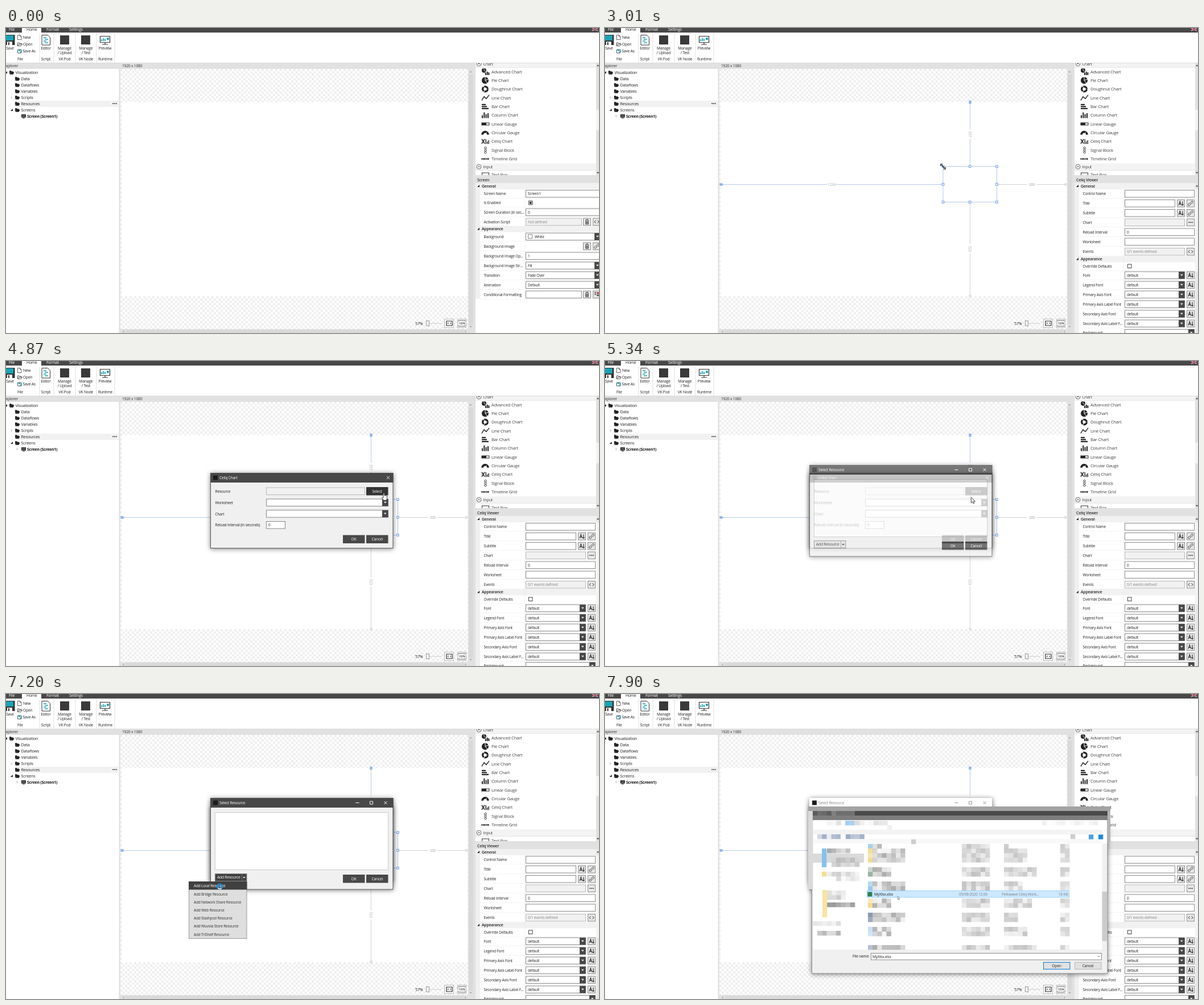
Animation of 1042 by 537 pixels, one loop 8 s. Source, as an HTML page:

```html
<!DOCTYPE html>
<html lang="en">
<head>
<meta charset="utf-8">
<title>Chart control walkthrough</title>
<style>
html, body { margin: 0; width: 100%; height: 100%; overflow: hidden; background: #fff; }
svg { display: block; width: 100%; height: 100%; }
text { font-family: "Open Sans", "Noto Sans", sans-serif; letter-spacing: -.03em; white-space: pre; }
.window { filter: drop-shadow(0 1px 4px rgba(0,0,0,.5)); }
</style>
</head>
<body>
<svg id="stage" viewBox="0 0 1042 537"></svg>
<script>
const DARK = '#484848', BAND = '#e1e1e1', BLUE = '#6d9be6', TEAL = '#1aa3b5';

// Drawing helpers; text is placed by its vertical centre.
const rect = (x, y, w, h, fill, stroke) =>
  `<rect x="${x}" y="${y}" width="${w}" height="${h}" fill="${fill}"${stroke ? ` stroke="${stroke}"` : ''}/>`;
const text = (x, y, s, size = 6.7, fill = '#222', attrs = '') =>
  `<text x="${x}" y="${y + size * .36}" font-size="${size}" fill="${fill}" ${attrs}>${s}</text>`;
const mid = (x, y, s, size, fill) => text(x, y, s, size, fill, 'text-anchor="middle"');
const line = (d, stroke = '#222', w = 1) => `<path d="${d}" fill="none" stroke="${stroke}" stroke-width="${w}"/>`;
const shape = (d, fill = '#222') => `<path d="${d}" fill="${fill}"/>`;
const circle = (x, y, r, fill, stroke = 'none', w = 1) =>
  `<circle cx="${x}" cy="${y}" r="${r}" fill="${fill}" stroke="${stroke}" stroke-width="${w}"/>`;
const at = (x, y, body) => `<g transform="translate(${x} ${y})">${body}</g>`;
const layer = (id, body, attrs = '') => `<g id="${id}" ${attrs}>${body}</g>`;
const down = (x, y, fill) => shape(`M${x - 2.3} ${y - 1.2}h4.6l-2.3 2.6z`, fill);
const up = (x, y, fill) => shape(`M${x - 2.3} ${y + 1.2}h4.6l-2.3-2.6z`, fill);
const opened = (x, y) => shape(`M${x - 2} ${y + 2}h4v-4z`);
const closed = (x, y) => line(`M${x - 1} ${y - 2}l2 2l-2 2z`, '#aaa', .6);

function ribbon() {
  let s = rect(0, 0, 1042, 8, DARK) + rect(28, 0, 34, 8, '#fff');
  [[5, 'File'], [36, 'Home'], [71, 'Format'], [111, 'Settings']].forEach(([x, t], i) =>
    s += text(x, 2.8, t, 6.9, i === 1 ? '#222' : '#fff'));
  s += rect(1030, 0, 10, 5, '#5d526f') + line('M1030 0l10 5M1040 0l-10 5', '#e8d5d5', 1)
    + line('M1035 0v5M1030 2.5h10', '#c33b45', 1.2);
  for (const x of [58.5, 83.5, 121.5, 158.5, 190.5]) s += rect(x, 10, 1, 51, '#e2e2e2');
  s += rect(0, 12, 15.5, 18, '#333') + rect(0, 13, 13, 9, TEAL) + rect(2, 24, 9, 6, '#fff') + rect(4, 25, 2, 5, '#333');
  s += mid(7, 36, 'Save');
  s += line('M20.5 12.5h4l2.5 2.5v5.5h-6.5zM24.5 12.5v2.5h2.5', '#555', .9)
    + line('M20.5 31.5v-5.5h2.5l1 1h3v1.5M20.5 31.5l2-3h6l-2 3z', '#444', .9)
    + line('M20.5 38h6.5v6h-6.5z', '#444', .9) + rect(22, 38, 3.5, 2.5, TEAL) + line('M24 44l4-4', TEAL, 1.3);
  s += text(30, 16.3, 'New') + text(30, 28.5, 'Open') + text(29.5, 40.8, 'Save As');
  s += line('M63 12.5h10.5l4 4v13.5h-14.5z', '#333', 1) + line('M66 17h5M68 20h6M66 23h5M68 26h6', TEAL, 1.3);
  s += rect(95, 13, 16, 16, '#3a3a3a') + rect(132, 13, 16, 16, '#3a3a3a');
  s += line('M165.5 14.5h17v11h-17zM174 25.5v3M169 29h10', '#333', 1.2)
    + line('M168 23v-3M171 23v-5M174 23v-4', TEAL, 1.8) + circle(179, 19, 2.2, TEAL);
  [[70, 36, 'Editor'], [103, 36, 'Manage'], [103, 43.3, '/ Upload'], [140.5, 36, 'Manage'], [140.5, 43.3, '/ Test'],
   [174, 36, 'Preview'], [25, 55, 'File'], [70, 55, 'Script'], [103, 55, 'VK Pod'], [140.5, 55, 'VK Node'], [174.5, 55, 'Runtime']]
    .forEach(a => s += mid(...a));
  return s + rect(0, 61, 1042, 1, '#dcdcdc');
}

function explorer() {
  let s = rect(0, 62, 199, 10, BAND) + text(-4, 67, 'Explorer', 6.9, '#333') + rect(16, 128, 182, 11, '#f1f1f1');
  ['Visualization', 'Data', 'Dataflows', 'Variables', 'Scripts', 'Resources', 'Screens'].forEach((t, i) => {
    const x = i ? 16 : 6, y = 78.5 + 11 * i;
    s += shape(`M${x} ${y + 3}v-6.3h3l1 1.2h3v1.6h-4.6zM${x + .6} ${y + 3.2}l1.9-4h6l-1.9 4z`) + text(x + 10.5, y, t, 7.3);
  });
  s += opened(0, 78) + closed(10, 122.5) + opened(10, 144);
  s += rect(27.5, 152.5, 7, 4.5, '#555', '#222') + rect(29, 158, 4, 1, '#222');
  s += text(37, 155.5, 'Screen (Screen1)', 6.9, '#111', 'font-weight="700"');
  for (const x of [188.2, 191, 193.8]) s += circle(x, 133, 1, '#333');
  return s + rect(198.5, 62, 2.5, 475, BAND);
}

function canvasArea() {
  let s = rect(201, 62, 621, 10, BAND) + text(204, 67, '1920 x 1080', 6.7, '#333');
  s += rect(201, 72, 611, 458, 'url(#checker)') + rect(203.5, 130.3, 607.5, 341.7, '#fff');
  s += rect(812, 72, 10, 465, BAND) + rect(813, 82, 7.5, 440, '#d9d9d9') + up(816.5, 77, '#aaa') + down(816.5, 526, '#aaa');
  s += rect(201, 530, 611, 7, BAND) + rect(211, 531.5, 593, 5, '#d9d9d9');
  s += shape('M207.5 532.3v4.4l-2.4-2.2z', '#aaa') + shape('M806.5 532.3v4.4l2.4-2.2z', '#aaa');
  s += text(719, 520.5, '57%', 7.2) + rect(744, 519.5, 21, 1, '#ccc') + rect(738.5, 515.5, 5, 9, '#f4f4f4', '#999');
  s += rect(770.5, 512.5, 16, 15, '#fff', '#b5b5b5') + rect(793.5, 512.5, 15, 15, '#fff', '#b5b5b5');
  s += line('M774 516h10v8h-10z', '#222', 1.2) + line('M778 518.5l-2 1.5l2 1.5M780 518.5l2 1.5l-2 1.5', '#222', .8);
  s += line('M795 516.5v-1.5h12v1.5M795 523.5v1.5h12v-1.5', '#333', .8) + mid(801, 520, '100%', 5, '#111');
  return s + rect(822, 62, 3, 475, BAND);
}

function toolbox() {
  const bars = list => list.map(b => rect(...b, '#222')).join('');
  const tools = [
    ['Advanced Chart', circle(-2, -2, 4, '#222') + line('M-2 -2v-5M-2 -2l4 2', '#fff', .8) + bars([[0, 2, 2, 4], [2.8, 0, 2, 6], [5.4, 1.5, 2, 4.5]])],
    ['Pie Chart', circle(0, 0, 6, '#222') + line('M0 -6v6l6 -2M0 0l4 5', '#fff', 1)],
    ['Doughnut Chart', `<circle r="4.4" fill="none" stroke="#222" stroke-width="3.2" stroke-dasharray="8.2 1"/>`],
    ['Line Chart', line('M-6 4.5l4-6.5l4 3.5l5-6.5', '#222', 1.4)],
    ['Bar Chart', bars([[-6, -4.5, 7, 2.2], [-6, -1, 9, 2.2], [-6, 2.5, 12, 2.2]])],
    ['Column Chart', bars([[-6, 0, 2, 5], [-2.7, -5, 2, 10], [.6, -2, 2, 7], [4, -3.5, 2, 8.5]])],
    ['Linear Gauge', rect(-6, -2, 13, 4, '#fff', '#222') + rect(-6, -2, 8, 4, '#222')],
    ['Circular Gauge', line('M-5 3.5a5 5 0 0 1 10 0', '#222', 3.8) + line('M0 3l3-4', '#fff', .8)],
    ['Celiq Chart', line('M-6 -4l5 8M-1 -4l-5 8', '#222', 1.6) + bars([[.5, -4, 1.4, 8.5], [3, 0, 1.4, 4.5], [5.5, -2, 1.4, 6.5]])],
    ['Signal Block', [-4, 0, 4].map(y => circle(.5, y, 1.8, '#fff', '#444')).join('')],
    ['Timeline Grid', bars([[-6.5, -1.2, 2, 2.6], [-3.5, -1.2, 3, 2.6], [.5, -1.2, 2, 2.6], [3.5, -1.2, 3, 2.6]])],
  ];
  const header = (y, t) => rect(825, y - 6, 212, 12, '#f3f3f3') + rect(825, y + 6, 212, .7, '#ddd')
    + circle(831, y, 4, '#fff', '#444', .8) + line(`M829 ${y + 1}l2-2l2 2`) + text(838.5, y, t, 7.2, '#444');
  let s = header(63, 'Chart') + layer('hover', rect(825, 192, 212, 15.3, '#f4f4f4'));
  tools.forEach(([t, icon], i) => {
    const y = 76.8 + 15.36 * i;
    s += at(842, y, icon) + text(853, y, t, 7.7, '#444');
  });
  s += header(244.3, 'Input') + rect(836.5, 255, 12, 7, '#fff', '#333') + text(853, 257.8, 'Text Box', 7.7, '#444');
  s += rect(1037, 62, 5, 197, '#e0e0e0') + rect(1037, 144, 5, 36, '#f3f3f3') + up(1040, 66, '#555') + down(1040, 255, '#555');
  return `<g clip-path="url(#toolClip)">${s}</g>`;
}

// Property panel pieces
const field = (x, right, y, t = '', off) =>
  rect(x + .5, y - 6, right - x, 12.5, off ? '#f1f1f1' : '#fff', off ? '#b8b8b8' : '#888') + text(x + 4, y + .4, t, 6.5, off ? '#888' : '#222');
const combo = (x, right, y, t = '') => field(x, right, y, t) + rect(right - 10, y - 6, 10.5, 12.5, DARK) + down(right - 4.7, y, '#fff');
const glyphs = {
  trash: line('M-3 -3h6M-1 -4.2h2M-2.3 -2v6h4.6v-6M-.8 -1v4M.8 -1v4', '#222', .9),
  code: line('M-1.5 -2.5l-2.5 2.5l2.5 2.5M1.5 -2.5l2.5 2.5l-2.5 2.5', '#222', 1),
  link: line('M-.5 -1.5l2-2a1.6 1.6 0 0 1 2.3 2.3l-2 2M.5 1.5l-2 2a1.6 1.6 0 0 1-2.3-2.3l2-2M-1.3 1.3l2.6-2.6', '#333', 1),
  font: line('M-4 3.5l2.3-7l2.3 7M-3.2 1.2h3M3 -3.5v7l-1.5-1.5M3 3.5l1.5-1.5', '#222', 1.1),
  dots: [-2.8, 0, 2.8].map(x => circle(x, 0, .9, '#222')).join(''),
  rules: line('M-4 -3h3M-4 0h3', '#222', 1.2) + rect(0, -4, 4, 3, '#c23b3b') + rect(0, 0, 4, 3, '#666'),
};
const button = (x, y, g) => rect(x + .5, y - 6, 13, 12.5, '#e8e8e8', '#888') + at(x + 7, y + .2, glyphs[g]);
const check = (y, on) => rect(918.5, y - 3, 6.5, 6.5, '#fff', '#444') + (on ? rect(920, y - 1.4, 3.5, 3.5, '#222') : '');

function panel(title, end, sections, rows) {
  let s = rect(825, 259, 217, 278, '#fff') + rect(825, 259, 217, 14, BAND) + text(828, 267.5, title, 6.9, '#333', 'font-weight="600"')
    + rect(825, 273, 8, end - 273, '#f0f0f0');
  for (const [y, t] of sections)
    s += rect(825, y - 5.5, 217, 11, '#f1f1f1') + opened(830, y - .5) + text(836, y, t, 6.9, '#222', 'font-weight="600"');
  for (const [y, label, body] of rows)
    s += rect(833, y + 8, 209, .6, '#ededed') + text(839.5, y + .4, label, 6.6) + body(y);
  return s + rect(911, 284, .6, end - 284, '#e9e9e9');
}

const screenPanel = () => panel('Screen', 477, [[278.5, 'General'], [354, 'Appearance']], [
  [291.5, 'Screen Name', y => field(913, 1044, y, 'Screen1')],
  [307.5, 'Is Enabled', y => check(y, true)],
  [324, 'Screen Duration (in sec...', y => field(913, 1044, y, '0')],
  [341, 'Activation Script', y => field(913, 1011, y, 'Not defined', true) + button(1014, y, 'trash') + button(1031, y, 'code')],
  [367, 'Background', y => combo(913, 1044, y) + rect(917.5, y - 3.5, 7, 7, '#fff', '#888') + text(929, y + .4, 'White', 6.5)],
  [384, 'Background Image', y => button(1014, y, 'trash') + button(1031, y, 'link')],
  [401, 'Background Image Op...', y => field(913, 1044, y, '1')],
  [418, 'Background Image Str...', y => combo(913, 1044, y, 'Fill')],
  [435, 'Transition', y => combo(913, 1044, y, 'Fade Over')],
  [452, 'Animation', y => combo(913, 1044, y, 'Default')],
  [469, 'Conditional Formatting', y => field(913, 1011, y) + button(1014, y, 'trash') + button(1031, y, 'rules')],
]);

function viewerPanel() {
  const titled = y => field(913, 1001, y) + button(1005, y, 'font') + button(1022, y, 'link');
  const plain = t => y => field(913, 1035, y, t);
  const extra = (t, g) => y => field(913, 1018, y, t, true) + button(1022, y, g);
  const fonts = ['Font', 'Legend Font', 'Primary Axis Font', 'Primary Axis Label Font', 'Secondary Axis Font', 'Secondary Axis Label F...']
    .map((t, i) => [435 + 17 * i, t, y => combo(913, 1018, y, 'default') + button(1022, y, 'font')]);
  return panel('Celiq Viewer', 537, [[278.5, 'General'], [407, 'Appearance']], [
    [291.5, 'Control Name', plain('')], [308.5, 'Title', titled], [325.5, 'Subtitle', titled],
    [342, 'Chart', extra('', 'dots')], [359, 'Reload Interval', plain('0')], [376, 'Worksheet', plain('')],
    [393.5, 'Events', extra('0/1 events defined', 'code')], [419, 'Override Defaults', y => check(y)],
    ...fonts, [536.5, 'Background', y => combo(913, 1035, y)],
  ]) + rect(1037, 273, 5, 264, '#e6e6e6') + rect(1037, 284, 5, 145, '#f3f3f3') + up(1040, 278, '#555');
}

function selection() {
  const label = (x, y, s, turn) => at(x, y, `<g transform="rotate(${turn})">${rect(-8, -4, 16, 8, '#fff')}${mid(0, 0, s, 6.6, '#b0b0b0')}</g>`);
  let s = line('M204 275.5H594M641.5 131V243', '#b7caee') + line('M689 275.5H809M641.5 307V471', '#d2d2d2');
  s += label(398, 275.5, '1234', 0) + label(750, 275.5, '386', 0) + label(641.5, 187, '357', 90) + label(641.5, 389, '523', 90);
  s += rect(202, 274, 4, 3, '#a9c6f5', BLUE) + rect(640, 128.5, 3, 4, '#a9c6f5', BLUE);
  s += rect(808, 274, 2.5, 3, '#fff', '#ccc') + rect(640, 470.5, 3, 3, '#fff', '#ccc');
  s += rect(594, 243.5, 94.5, 63, '#fff', '#b3c8f0');
  for (const x of [594, 641.2, 688.5]) for (const y of [243.8, 275.2, 306.5])
    if (x !== 641.2 || y !== 275.2) s += rect(x - 1.8, y - 1.8, 3.6, 3.6, '#fff', BLUE);
  return s + closed(20, 155);
}

const push = (x, y, t, id = '') => `<rect ${id} x="${x}" y="${y}" width="38.5" height="14.5" fill="${DARK}"/>` + mid(x + 19.2, y + 7.4, t, 6.7, '#fff');
const frame = (y, h, title, id) => rect(359.5, y + .5, 320.5, h, '#f0f0f0', '#555')
  + `<rect id="${id}Bar" x="359" y="${y}" width="321.5" height="17" fill="${DARK}"/>` + rect(364, y + 4.5, 8, 8, '#1c1c1c')
  + text(375, y + 8.8, title, 6.6, '#fff', `id="${id}Title"`);

function chartDialog() {
  let s = frame(197, 132, 'Celiq Chart', 'chart') + line('M669 203l5 5M674 203l-5 5', '#fff', .9);
  ['Resource', 'Worksheet', 'Chart', 'Reload Interval (in seconds)'].forEach((t, i) => s += text(367.5, 230 + 19.7 * i, t, 6.6));
  s += field(457, 630, 229, '', true) + push(633, 222, 'Select', 'id="select"') + combo(457, 671, 249) + combo(457, 671, 268.7) + field(457, 490, 288.5, '0');
  return s + push(592, 306.5, 'OK') + push(633, 306.5, 'Cancel');
}

function resourceDialog() {
  let s = frame(183, 160.5, 'Select Resource', 'resource');
  s += `<g id="resourceKeys" fill="none" stroke="#fff"><path d="M614.5 191.5h6M639.5 189h5v5h-5zM664.5 189l5 5M669.5 189l-5 5"/></g>`;
  s += rect(367.5, 208.5, 304, 101, '#fff', '#ccc');
  s += `<rect id="addBack" x="367.5" y="316.5" width="55.5" height="13" stroke="#888"/><g id="addText">`
    + text(371, 323, 'Add Resource', 6.7, 'inherit') + `<path d="M416.2 322h4.6l-2.3 2.6z"/></g>` + rect(414, 317, .7, 12, '#888');
  return s + push(592, 318, 'OK') + push(633, 318, 'Cancel');
}

function menu() {
  let s = rect(321.5, 330.5, 101.5, 100, '#dedede', '#999') + layer('menuHover', rect(321, 330, 102.5, 14.5, '#404040'));
  ['Local', 'Bridge', 'Network Share', 'Web', 'Stashpod', 'Wuvola Store', 'TriShelf'].forEach((t, i) =>
    s += text(330, 338 + 14.2 * i, `Add ${t} Resource`, 6.5, '#333', i ? '' : 'id="firstItem"'));
  return s;
}

function fileDialog() {
  let seed = 11;
  const random = () => (seed = seed * 16807 % 2147483647) / 2147483647;
  const blocks = (x, y, cols, rows, color, low = .2, high = 1) => {
    let s = '';
    for (let i = 0; i < cols * rows; i++)
      s += `<rect x="${x + i % cols * 8.2}" y="${y + (i / cols | 0) * 8.2}" width="8.3" height="8.3" fill="${color}" opacity="${(low + random() * (high - low)).toFixed(2)}"/>`;
    return s;
  };
  let s = `<g class="window">${rect(363.5, 222, 519.5, 270, '#f0f0f0', '#888')}</g>`;
  s += rect(357, 198, 531, 8.2, '#a3a3a3') + rect(357, 206, 8.2, 138, '#dadada') + rect(882, 206, 6, 55, '#b5b5b5');
  s += rect(365, 206, 518, 8.3, '#4a4a4a') + blocks(365, 206, 9, 1, '#a0a0a0', .2, .7) + rect(365, 214, 518, 8.3, '#7d7d7d');
  s += rect(366, 222, 516, 228, '#fff') + rect(366, 239, 508, 8.2, '#f3f3f3') + rect(366, 255, 508, 8.2, '#f8f8f8');
  s += blocks(390, 223, 13, 1, '#ccc', 0, .8) + blocks(422, 223, 2, 1, '#9fcdf2', .8) + blocks(496, 231, 1, 1, '#ddd') + blocks(768, 223, 12, 1, '#ddd', 0, .5);
  s += blocks(373, 247, 5, 1, '#9cacc4') + blocks(423, 247, 4, 1, '#9cacc4', .6) + blocks(538, 256, 1, 1, '#ccc', .9)
    + blocks(818, 247, 1, 1, '#ccc', .9) + rect(850, 247.5, 8.3, 8.3, '#4aa2e2') + rect(867, 247.5, 8.3, 8.3, '#2389da');
  s += rect(365, 281, 90, 16, '#dadada') + blocks(390, 272, 5, 1, '#aaa') + blocks(398, 288, 6, 2, '#b5b5b5', .1, .8)
    + blocks(390, 313, 7, 2, '#c5c5c5', 0, .8) + blocks(390, 346, 4, 2, '#c9c9c9') + blocks(390, 367, 6, 1, '#9a9a9a', .4)
    + blocks(365, 400, 6, 1, '#ddd') + blocks(373, 417, 5, 1, '#b5b5b5', .4);
  s += rect(381, 272, 8.3, 33, '#86c1ec') + rect(381, 313, 8.3, 8.3, '#f4dd94') + rect(382, 345, 8.3, 48, '#f8e3a2');
  [[264, 1, '#9cc9ec'], [272, 3, '#f4d98a'], [305, 2, '#8fae9a'], [330, 2, '#8ec3ee'], [360, 2, '#f4d98a'], [385, 2, '#8b98b3'], [410, 2, '#a8cff0'], [442, 1, '#7388b0']]
    .forEach(([y, n, icon], i) => {
      s += blocks(462, y, 1, n, icon, .5) + blocks(470, y, i ? 4 + i * 3 % 6 : 2, n, '#a5a5a5', .1, .9)
        + blocks(627, y, 6, n, '#b0b0b0', .2, .8) + blocks(701, y, i ? 3 + i * 2 % 5 : 1, n, '#bdbdbd', .2, .9) + blocks(800, y, 2, n, '#c4c4c4', .2, .9);
    });
  s += rect(873.5, 263, 8.5, 187, '#f0f0f0') + rect(873.5, 348, 8.5, 87, '#cbcbcb');
  s += rect(460, 346, 356, 13, '#fff') + layer('picked', rect(460.5, 346.5, 355, 11.5, '#cce8ff', '#99d1ff'));
  s += rect(461.5, 348.5, 8, 8, '#2f7d55') + text(473, 352.3, 'MyXlsx.xlsx', 6.7);
  s += text(622, 352.3, '05/08/2020 12:06', 6.5, '#7d7d7d') + text(697, 352.3, 'Pellowave Celiq Work...', 6.5, '#7d7d7d') + text(797, 352.3, '16 KB', 6.5, '#7d7d7d');
  s += text(464.5, 462, 'File name:', 6.6, '#222', 'text-anchor="end"') + rect(467.5, 456.5, 405, 11.5, '#fff', '#8a8a8a')
    + line('M865.5 461l2 2l2-2', '#555', .9) + layer('fileName', text(470, 462.3, 'MyXlsx.xlsx', 6.6));
  s += rect(770.5, 472.5, 46.5, 12, '#e1e1e1', '#0078d7') + rect(825.5, 472.5, 46.5, 12, '#e1e1e1', '#b5b5b5');
  return s + mid(793.5, 478.5, 'Open', 6.7) + mid(848.5, 478.5, 'Cancel', 6.7);
}

const arrow = `<path d="M0 0v10.2l2.4-2.2l1.6 3.5l1.6-.8l-1.6-3.3h3.3z" fill="#fff" stroke="#333" stroke-width=".9"/>`;
const pointers = {
  arrow,
  tip: `<g transform="scale(.55)">${arrow}</g>`,
  hand: `<path d="M-1 1q1-1.6 2 0v4l1-.3l1.2.5l1.1 0l1.2.6v4l-1 3.5h-5l-2.8-4.5q.3-1.6 1.7-.6l.6.7z" fill="#fff" stroke="#333" stroke-width=".9"/>`,
  drag: arrow + rect(9.5, 8.5, 7, 6, '#fff', '#555') + line('M13 9.5v4M11 11.5h4', '#333', .9),
  resize: line('M-2.5 -2.5l5 5', '#222', 1.6) + line('M-4.5 -1v-3.5h3.5zM4.5 1v3.5h-3.5z', '#222', 1),
  busy: circle(0, 0, 4, 'none', '#a9dcfa', 2.6) + `<path id="arc" d="M0 -4a4 4 0 1 1 -4 4" fill="none" stroke="#1186d8" stroke-width="2.6"/>`,
};

const $ = id => document.getElementById(id);
$('stage').innerHTML = `<defs>
  <pattern id="checker" x="201" y="72" width="8" height="8" patternUnits="userSpaceOnUse">${rect(0, 0, 8, 8, '#fff')}${rect(0, 0, 4, 4, '#efefef')}${rect(4, 4, 4, 4, '#efefef')}</pattern>
  <clipPath id="toolClip">${rect(825, 62, 217, 197, '#000')}</clipPath></defs>`
  + rect(0, 0, 1042, 537, '#fff') + canvasArea() + explorer() + ribbon() + toolbox()
  + layer('screenPanel', screenPanel()) + layer('viewer', viewerPanel() + selection())
  + layer('chart', chartDialog(), 'class="window"') + layer('resource', resourceDialog(), 'class="window"')
  + layer('menu', menu()) + layer('files', fileDialog())
  + layer('pointer', Object.entries(pointers).map(([k, body]) => layer(k, body)).join(''));

// Pointer path: time, x, y, shape; moves are sampled every STEP ms.
const STEP = 76.9, LOOP = 8000;
const path = [
  [230, 659, 308, 'arrow'], [610, 800, 228, 'arrow'], [840, 868, 200, 'hand'], [990, 861, 199, 'hand'], [1060, 861, 198, 'hand'],
  [1380, 861, 198, 'hand'], [1455, 845, 200, 'drag'], [1850, 665, 228, 'drag'], [2150, 594, 242, 'drag'], [2230, 594, 242, 'drag'],
  [2540, 592, 242, 'drag'], [3010, 594, 244, 'resize'], [3410, 594, 244, 'arrow'], [4020, 654, 272, 'arrow'], [4420, 654, 272, 'arrow'],
  [4720, 663, 238, 'hand'], [4870, 664, 232, 'hand'], [5260, 664, 232, 'arrow'], [5880, 497, 295, 'arrow'], [6030, 427, 306, 'arrow'],
  [6110, 420, 319, 'arrow'], [6190, 418, 321, 'arrow'], [6350, 376, 336, 'arrow'], [7040, 375.5, 339, 'busy'], [7280, 375.5, 339, ''],
  [7820, 500, 352, 'tip'], [7900, 514, 356, 'tip'],
];
const show = (id, on) => $(id).style.display = on ? '' : 'none';
const fade = (id, t, start) => { show(id, t >= start); $(id).style.opacity = Math.min(1, .45 + (t - start) / 280); };

function movePointer(t) {
  const i = path.findLastIndex(p => t >= p[0]);
  const a = path[i], b = path[i + 1] || a;
  show('pointer', a && a[3]);
  if (!a) return;
  const p = a === b ? 0 : Math.floor((t - a[0]) / STEP) * STEP / (b[0] - a[0]);
  const moving = a[0] === 1060 || a[0] === 2540 || a[0] === 6350 ? 0 : p;
  $('pointer').setAttribute('transform', `translate(${a[1] + (b[1] - a[1]) * moving} ${a[2] + (b[2] - a[2]) * moving})`);
  for (const k in pointers) show(k, k === a[3]);
  $('arc').setAttribute('transform', `rotate(${Math.floor(t / STEP) * 45})`);
}

function draw(t) {
  const dropped = t >= 3010, menuOpen = t >= 6190 && t < 7290, away = t >= 7290, over = t >= 6270;
  show('hover', t >= 840 && !dropped);
  show('screenPanel', !dropped);
  show('viewer', dropped);
  fade('chart', t, 3410);
  fade('resource', t, 5260);
  show('menu', menuOpen);
  show('menuHover', over);
  $('firstItem').setAttribute('fill', over ? '#fff' : '#333');
  $('select').setAttribute('fill', t >= 4720 ? '#333' : DARK);
  $('addBack').setAttribute('fill', menuOpen ? '#404040' : '#e1e1e1');
  $('addText').setAttribute('fill', menuOpen ? '#fff' : '#222');
  $('resourceBar').setAttribute('fill', away ? '#fff' : DARK);
  $('resourceTitle').setAttribute('fill', away ? '#888' : '#fff');
  $('resourceKeys').setAttribute('stroke', away ? '#999' : '#fff');
  fade('files', t, 7290);
  show('picked', t >= 7820);
  show('fileName', t >= 7900);
  movePointer(t);
}

const begin = performance.now();
function tick() {
  draw((performance.now() - begin) % LOOP);
  requestAnimationFrame(tick);
}
tick();
</script>
</body>
</html>
```
